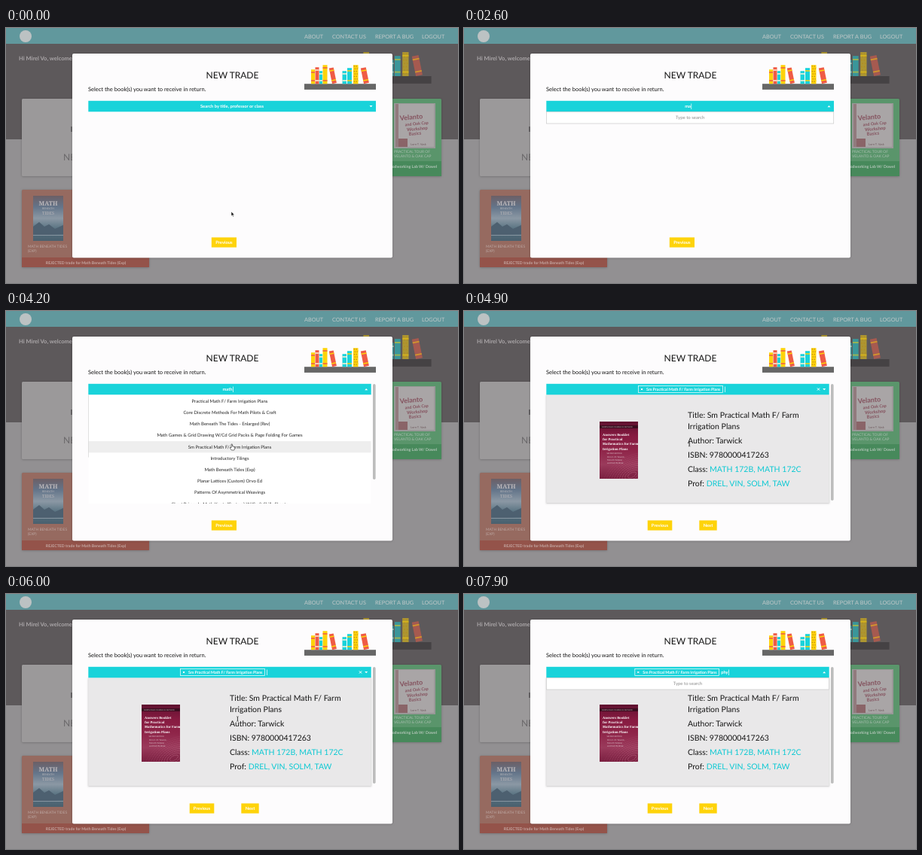
An HTML page with a canvas for the animation above (8 s loop, 600x339 px).

```html
<!DOCTYPE html>
<html lang="en">
<head>
<meta charset="utf-8">
<title>New trade</title>
<style>
html, body { margin: 0; width: 100%; height: 100%; overflow: hidden; background: #929092; }
canvas { display: block; width: 600px; height: 339px; }
</style>
</head>
<body>
<canvas id="stage" width="600" height="339"></canvas>
<script>
const ctx = document.getElementById('stage').getContext('2d');
const LOOP = 8000, STEP = 100;
const TEAL = '#19d3da', YELLOW = '#fed30a', CORAL = '#ef5b45', CREAM = '#fff3d8', INK = '#151515';
const SANS = 'Lato, sans-serif', SERIF = '"Noto Serif", serif';
const PICK = 'Sm Practical Math F/ Farm Irrigation Plans';
const OPTIONS = [
  'Practical Math F/ Farm Irrigation Plans',
  'Core Discrete Methods For Math Pilots & Craft',
  'Math Beneath The Tides - Enlarged (Rev)',
  'Math Games & Grid Drawing W/Cd Grid Packs & Page Folding For Games',
  PICK,
  'Introductory Tilings',
  'Math Beneath Tides (Exp)',
  'Planar Lattices (Custom) Orvo Ed',
  'Patterns Of Asymmetrical Weavings',
  'Short Primer In Math Knots (Custom) W/Craft Skills Sheets'
];
const LEFT = 109.3, RIGHT = 491, RIGHT_NARROW = 484.7;
const ROW = 15.2, MENU_TOP = 111, MENU_BOTTOM = 256;
const OPENED = 1400, LISTED = 3100, SELECTED = 4300, REOPENED = 7500;
// Time, then the text in the search field from that time on.
const TYPING = [[0, ''], [2400, 'm'], [2600, 'ma'], [2800, 'mat'], [2900, 'math'],
  [SELECTED, ''], [7600, 'p'], [7700, 'ph'], [7900, 'phy']];
// Time, x, y of the pointer.
const PATH = [[0, 299, 244], [200, 299, 244], [1000, 303, 102], [3200, 303, 102],
  [4100, 299, 177], [4800, 299, 177], [5200, 300, 175], [5800, 300, 175],
  [6700, 359, 104], [LOOP, 359, 104]];

function rect(x, y, w, h, color) {
  ctx.fillStyle = color;
  ctx.fillRect(x, y, w, h);
}

function rounded(x, y, w, h, r, color) {
  ctx.fillStyle = color;
  ctx.beginPath();
  ctx.roundRect(x, y, w, h, r);
  ctx.fill();
}

function shadowed(blur, color, draw) {
  ctx.save();
  ctx.shadowBlur = blur;
  ctx.shadowOffsetY = 0.5;
  ctx.shadowColor = color;
  draw();
  ctx.restore();
}

function setFont(size, weight, family = SANS) {
  ctx.font = `${weight} ${size}px ${family}`;
  ctx.textRendering = 'geometricPrecision';
}

function text(str, x, y, size, color, { weight = 400, align = 'left', family = SANS } = {}) {
  setFont(size, weight, family);
  ctx.textAlign = align;
  ctx.fillStyle = color;
  ctx.fillText(str, x, y);
}

function widthOf(str, size, weight) {
  setFont(size, weight);
  return ctx.measureText(str).width;
}

function gradient(y0, y1, colors) {
  const g = ctx.createLinearGradient(0, y0, 0, y1);
  colors.forEach((c, i) => g.addColorStop(i / (colors.length - 1), c));
  return g;
}

function polygon(points, fill, stroke) {
  ctx.beginPath();
  points.forEach(([x, y]) => ctx.lineTo(x, y));
  ctx.closePath();
  ctx.fillStyle = fill;
  ctx.fill();
  if (stroke) {
    ctx.strokeStyle = stroke;
    ctx.lineWidth = 0.6;
    ctx.stroke();
  }
}

function book(x, w, h, color, band, tilt = 0) {
  ctx.save();
  ctx.translate(x, 0);
  ctx.rotate(tilt);
  rect(0, -h, w, h, color);
  rect(0, -h + 3, w, 1.5, band);
  rect(0, -5, w, 1.5, band);
  ctx.restore();
}

function bookshelf(x, y, scale, shelfColor) {
  ctx.save();
  ctx.translate(x, y);
  ctx.scale(scale, scale);
  rect(0, 0, 95, 7.7, shelfColor);
  book(9, 5, 19, YELLOW, CORAL);
  book(14.5, 5, 22, CORAL, CREAM);
  book(20, 4, 17, TEAL, CREAM);
  book(24.5, 6, 25, YELLOW, CORAL);
  book(37, 6, 21, CORAL, YELLOW, -0.2);
  book(50.5, 5.5, 17, TEAL, CREAM);
  book(57, 6, 21, TEAL, YELLOW);
  book(65, 6.5, 25, YELLOW, YELLOW);
  for (let row = 0; row < 7; row++)
    for (let col = 0; col < 2; col++)
      rect(65.7 + col * 2.8 + row % 2, -24 + row * 3.4, 1.2, 1.2, '#b98212');
  book(79, 7, 21, CORAL, YELLOW, -0.2);
  ctx.restore();
}

function seaCover() {
  rect(36, 223, 40, 60, gradient(223, 283, ['#6b5f66', '#64758a', '#8b98a4', '#55707f', '#4a606e']));
  text('MATH', 56, 236, 8, '#bcb8bb', { weight: 700, align: 'center', family: SERIF });
  text('BENEATH', 56, 241, 3.5, '#b5b5b9', { align: 'center' });
  text('TIDES', 56, 247.5, 5.5, '#bcb8bb', { align: 'center', family: SERIF });
  polygon([[36, 264], [44, 258], [51, 264], [57, 261], [65, 267], [76, 262], [76, 274], [36, 276]], '#4d6070');
  rect(36, 275, 40, 1, '#8795a0');
}

function workshopCover() {
  rect(515, 100, 55, 60, '#999898');
  rect(517, 101, 51, 57, '#a9a5a6');
  rect(517, 101, 4, 57, '#917a7d');
  ctx.save();
  ctx.translate(523, 123);
  ctx.rotate(-0.09);
  const ink = '#84525e', bold = { weight: 700 };
  text('Velanto', 0, 0, 9, ink, bold);
  text('and Oak Cap', 6, 8, 5.5, ink, bold);
  text('Workshop', 8, 15, 6, ink, bold);
  text('Basics', 10, 21, 6, ink, bold);
  ctx.restore();
  rect(521, 147, 12, 11, '#8a6468');
  text('Lorn T. Vask', 537, 156, 4, '#6f5d60');
}

function card(x, y, w, h, color) {
  shadowed(3, 'rgba(0,0,0,.25)', () => rounded(x, y, w, h, 1.5, color));
}

function page() {
  rect(0, 0, 600, 339, '#929092');
  rect(0, 21, 600, 127, '#5d595b');
  rect(0, 0, 600, 21, '#61989d');
  ctx.fillStyle = '#bcc2c3';
  ctx.beginPath();
  ctx.arc(26, 11, 8, 0, 7);
  ctx.fill();
  [['ABOUT', 396], ['CONTACT US', 433], ['REPORT A BUG', 490], ['LOGOUT', 552]]
    .forEach(([label, x]) => text(label, x, 13.5, 7.3, '#c3caca'));
  text('Hi Mirel Vo, welcome back!', 17, 42.5, 7.5, '#aaa6a8', { weight: 700 });
  ctx.save();
  ctx.globalAlpha = 0.5;
  bookshelf(443, 64, 1.28, '#2f2c2e');
  ctx.restore();

  card(21, 94, 169, 103, '#9b999a');
  rect(86, 131, 2, 7, '#6a686a');
  text('NEW TRADE', 76, 176, 12, '#6a686a');

  card(409, 94, 169, 103, '#5a956b');
  rect(409, 177, 169, 20, '#47895b');
  workshopCover();
  text('PRACTICAL TOUR OF', 515, 166, 4.9, '#a9bfb0');
  text('VELANTO & OAK CAP', 515, 172, 4.9, '#a9bfb0');
  text('ACCEPTED trade for Woodworking Lab W/ Dowel', 572, 185.5, 5.2, '#b3c6b9', { weight: 700, align: 'right' });

  card(21, 215, 169, 103, '#966a60');
  rect(21, 305, 169, 13, '#94534a');
  seaCover();
  text('MATH BENEATH TIDES', 29, 292, 4.9, '#bda8a3');
  text('(EXP)', 29, 298, 4.9, '#bda8a3');
  text('REJECTED trade for Math Beneath Tides (Exp)', 106, 313.8, 5.2, '#c5a9a4', { weight: 700, align: 'center' });
}

function button(label, x, w) {
  rect(x, 278.4, w, 13.2, YELLOW);
  text(label, x + w / 2, 287, 5.8, '#fff', { weight: 700, align: 'center' });
}

function modal() {
  shadowed(3, 'rgba(0,0,0,.25)', () => rounded(88, 34, 425, 271.5, 2, '#fdfcfd'));
  text('NEW TRADE', 300.5, 66.7, 12, INK, { align: 'center' });
  text('Select the book(s) you want to receive in return.', 109, 83.5, 7.5, INK);
  bookshelf(396, 74.2, 1, '#666');
}

function solutionsCover() {
  rect(180, 147, 51, 76, gradient(147, 223, ['#5f1230', '#861a40', '#8f2549', '#9a3a5b', '#7a1f40']));
  ctx.save();
  ctx.beginPath();
  ctx.rect(180, 147, 51, 76);
  ctx.clip();
  ctx.lineWidth = 0.8;
  ctx.setLineDash([1, 1]);
  for (let i = 0; i < 10; i++) {
    ctx.strokeStyle = `rgba(235,165,185,${0.6 - i * 0.05})`;
    ctx.beginPath();
    ctx.ellipse(223, 218, 6 + i * 4, 3 + i * 2.4, -0.5, 0, 7);
    ctx.stroke();
  }
  ctx.restore();
  rect(180, 152, 51, 4, '#3a0d1f');
  text('NORTHFIELD COURSES IN METHOD', 183, 155, 2.4, '#d9c3ca');
  ['Answers Booklet', 'for Practical', 'Mathematics for Farm', 'Irrigation Plans'].forEach((line, i) =>
    text(line, 184, 165.7 + i * 6.3, 4.2, '#fff', { weight: 700, family: SERIF }));
  text('SECOND EDITION', 189.5, 189.5, 2.4, '#e4cdd4');
  ['Orin C. M. Tarwick,', 'Maro R. Feldane', 'and Holt W. Brisk'].forEach((line, i) =>
    text(line, 190, 194.5 + i * 4, 2.8, '#dcc0c9'));
}

function details() {
  shadowed(2, 'rgba(0,0,0,.2)', () => rect(LEFT, MENU_TOP, RIGHT_NARROW - LEFT, 144, '#e9e8e9'));
  solutionsCover();
  const size = 10.5, x = 297;
  text('Title: Sm Practical Math F/ Farm', x, 142, size, INK);
  text('Irrigation Plans', x, 157, size, INK);
  text('Author: Tarwick', x, 175.7, size, INK);
  text('ISBN: 9780000417263', x, 194.5, size, INK);
  [['Class: ', 'MATH 172B, MATH 172C', 213.5], ['Prof: ', 'DREL, VIN, SOLM, TAW', 232.5]].forEach(([label, link, y]) => {
    text(label, x, y, size, INK);
    text(link, x + widthOf(label, size, 400), y, size, '#0cc9d3');
  });
}

function arrow(x, y, up) {
  const d = up ? -1.1 : 1.1;
  polygon([[x - 2, y - d], [x + 2, y - d], [x, y + d]], '#fff');
}

function cross(x, y, r) {
  ctx.strokeStyle = '#fff';
  ctx.lineWidth = 1;
  ctx.beginPath();
  ctx.moveTo(x - r, y - r);
  ctx.lineTo(x + r, y + r);
  ctx.moveTo(x + r, y - r);
  ctx.lineTo(x - r, y + r);
  ctx.stroke();
}

function caretOn(t) {
  if (t < OPENED) return false;
  if (t < 2900) return t < 1700 || t >= 2200;
  return t >= REOPENED || (t - 2900) % 1000 < 500;
}

function field(t, right, query, open) {
  const chosen = t >= SELECTED, bold = { weight: 700 };
  rect(LEFT, 96.8, right - LEFT, 14.5, TEAL);
  arrow(right - 6.5, 104.2, open);
  const typed = widthOf(query, 5.8, 700);
  let x;
  if (chosen) {
    const tagWidth = widthOf(PICK, 5.25, 700) + 13.5;
    const left = 288.5 - (tagWidth + 2 + typed) / 2;
    ctx.strokeStyle = '#fff';
    ctx.lineWidth = 0.7;
    ctx.strokeRect(left, 99.5, tagWidth, 9);
    cross(left + 4.5, 104, 1.1);
    text(PICK, left + 10.5, 106, 5.25, '#fff', bold);
    if (!open || !query) cross(470.5, 104, 1.6);
    x = left + tagWidth + 2.5;
  } else {
    x = (LEFT + right - 6) / 2 - typed / 2;
    if (!query) text('Search by title, professor or class', 300, 106.2, 5.8, '#fff', { weight: 700, align: 'center' });
  }
  text(query, x, 106.2, 5.8, '#fff', bold);
  if (caretOn(t)) rect(x + typed + 0.4, 100.5, 0.7, 7.5, '#fff');
}

function prompt(right) {
  rect(LEFT, 111.3, right - LEFT, 15.7, '#fff');
  ctx.strokeStyle = '#c9c9c9';
  ctx.lineWidth = 0.7;
  ctx.strokeRect(LEFT + 0.3, 111.5, right - LEFT - 0.6, 15.5);
  text('Type to search', (LEFT + right) / 2, 121.2, 6, '#8b8b8b', { align: 'center' });
}

function optionList(pointerY) {
  const width = RIGHT_NARROW - LEFT, top = MENU_TOP + 0.5;
  ctx.save();
  ctx.beginPath();
  ctx.rect(LEFT, top, width, MENU_BOTTOM - top);
  ctx.clip();
  rect(LEFT, top, width, 150, '#fff');
  const hovered = Math.max(0, Math.floor((pointerY + 2 - top) / ROW));
  rect(LEFT, top + 0.8 + hovered * ROW, width, ROW, '#eeeeee');
  OPTIONS.forEach((name, i) =>
    text(name, 297, 121.8 + i * ROW, 6, '#262626', { align: 'center' }));
  rect(LEFT, top, 0.7, 83, '#c4c4c4');
  ctx.restore();
}

function pointerAt(t) {
  const i = PATH.findIndex(([time]) => time > t);
  const [t0, x0, y0] = PATH[i - 1], [t1, x1, y1] = PATH[i];
  const p = (t - t0) / (t1 - t0), e = p * p * (3 - 2 * p);
  return [x0 + (x1 - x0) * e, y0 + (y1 - y0) * e];
}

function pointer(t, x, y) {
  const hidden = (t >= 2400 && t < 3200) || t >= 7600;
  if (hidden) return;
  ctx.save();
  ctx.translate(x, y);
  if (t >= LISTED && t < SELECTED) {
    polygon([[0, 0], [1.3, 0], [1.6, 3], [4.5, 3.5], [4.8, 6], [3.8, 8], [0.3, 8], [-1.9, 4.8], [-1, 4.2], [0, 5]], '#fff', '#222');
  } else if (t >= SELECTED) {
    ctx.strokeStyle = '#333';
    ctx.lineWidth = 0.7;
    ctx.beginPath();
    for (const dx of [-1.2, 1.2]) {
      ctx.moveTo(dx, -3.3);
      ctx.quadraticCurveTo(0, -3.3, 0, -2);
      ctx.lineTo(0, 2);
      ctx.quadraticCurveTo(0, 3.3, dx, 3.3);
    }
    ctx.stroke();
  } else {
    polygon([[0, 0], [0, 6], [1.3, 4.8], [2.3, 7], [3.3, 6.5], [2.4, 4.4], [4.2, 4.3]], '#111', '#fff');
  }
  ctx.restore();
}

function draw(t) {
  const chosen = t >= SELECTED, listed = t >= LISTED && !chosen;
  const open = chosen ? t >= REOPENED : t >= OPENED;
  const right = t >= LISTED ? RIGHT_NARROW : RIGHT;
  const query = TYPING.filter(([time]) => time <= t).pop()[1];
  const [x, y] = pointerAt(t);
  page();
  modal();
  if (chosen) details();
  field(t, right, query, open);
  if (listed) optionList(y);
  else if (open) prompt(right);
  if (t >= LISTED) rounded(487, 97, 3.6, chosen ? 155 : 127, 1.8, '#bdbdbd');
  if (chosen) {
    button('Previous', 243.7, 32.6);
    button('Next', 312.3, 23.4);
  } else {
    button('Previous', 272.8, 33.2);
  }
  pointer(t, x, y);
}

const start = performance.now();
function frame() {
  const t = (performance.now() - start) % LOOP;
  draw(Math.floor(t / STEP) * STEP);
  requestAnimationFrame(frame);
}
frame();
</script>
</body>
</html>
```
